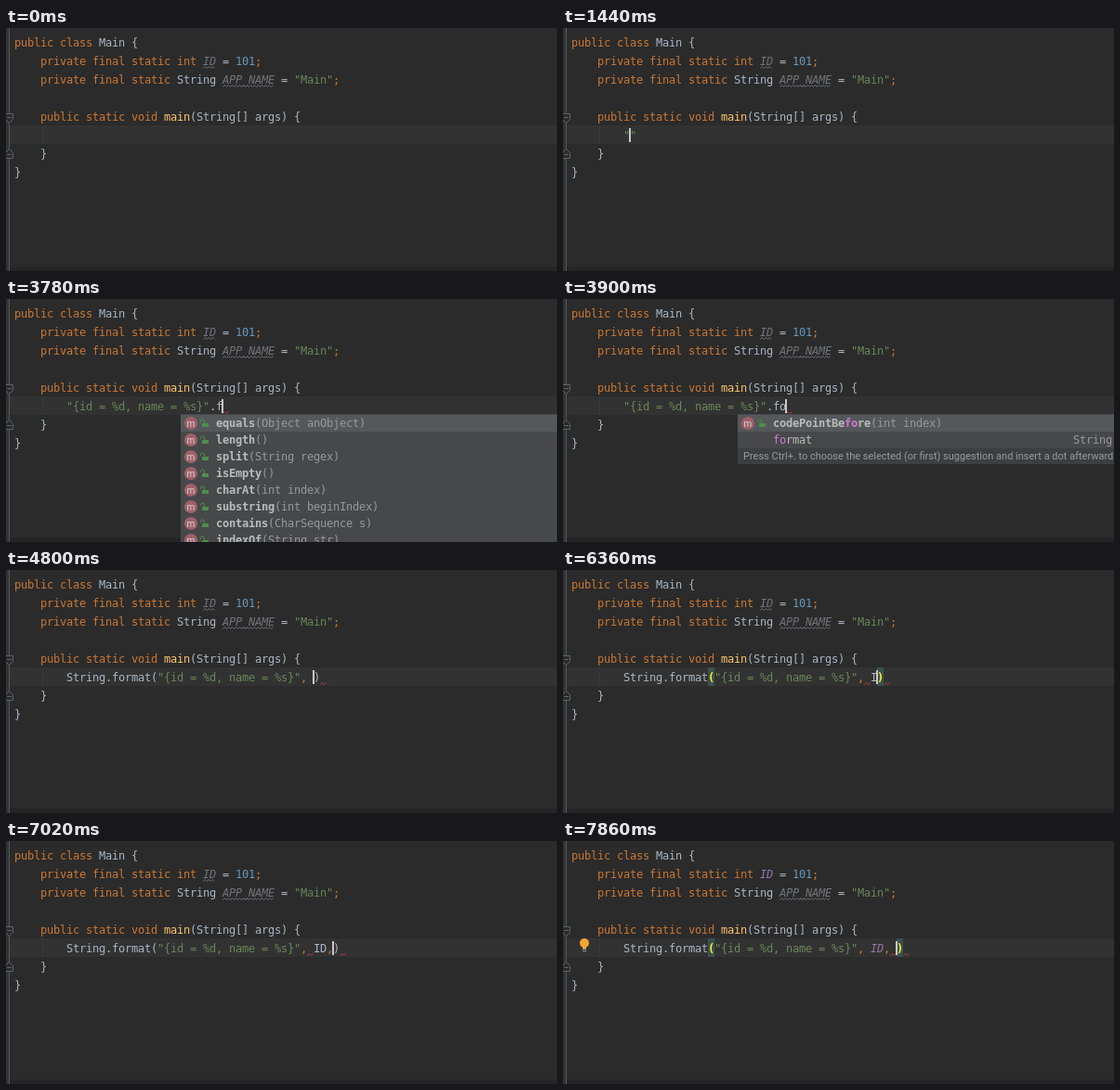
Write an HTML page that moves like this. It is 593x262 px and loops after 8 s.

```html
<!DOCTYPE html>
<html lang="en">
<head>
<meta charset="utf-8">
<title>Postfix completion</title>
<style>
  html, body { margin: 0; width: 100%; height: 100%; overflow: hidden; background: #2b2b2b; }
  svg { display: block; }
  text {
    font: 12px "DejaVu Sans Mono", monospace;
    letter-spacing: calc(7px - 1ch);
    white-space: pre;
    fill: #a9b7c6;
  }
  .keyword { fill: #cc7832; }
  .string { fill: #6a8759; }
  .number { fill: #6897bb; }
  .method { fill: #ffc66d; }
  .unused { fill: #72737a; font-style: italic; }
  .field { fill: #9876aa; font-style: italic; }
  .pair { fill: #ffef28; font-weight: bold; }
  .item { fill: #bbb; }
  .bold { font-weight: bold; }
  .match { fill: #d17ad6; }
  .dim { fill: #999; }
  .value { fill: #8c8c8c; font-style: italic; }
  .ad { font: 11px Roboto, sans-serif; letter-spacing: 0; fill: #999; }
  .badge { font: 10px Roboto, sans-serif; letter-spacing: 0; fill: #d4d4d4; text-anchor: middle; }
</style>
</head>
<body>
<svg id="stage" width="593" height="262" viewBox="0 0 593 262"></svg>
<script>
const LOOP = 8000, CHAR = 7, LEFT = 65, ROW = 18;
const TEMPLATE = '"{id = %d, name = %s}"';
const CALL = `String.format(${TEMPLATE}, `;
const HINT = 'Press Ctrl+. to choose the selected (or first) suggestion and insert a dot afterwards';

const method = (name, args) => ({ icon: 'm', name, tail: `(${args})`, bold: true });
const type = (icon, name, pkg) => ({ icon, name, tail: ` (${pkg})` });
const before = method('codePointBefore', 'int index');
const postfix = { name: 'format', right: 'String.format(expr)' };

const dotItems = [
  method('equals', 'Object anObject'), method('length', ''), method('split', 'String regex'),
  method('isEmpty', ''), method('charAt', 'int index'), method('substring', 'int beginIndex'),
  method('contains', 'CharSequence s'), method('indexOf', 'String str')
];
const fItems = [
  before, postfix, method('indexOf', 'int ch'), method('lastIndexOf', 'int ch'),
  method('replaceFirst', 'String regex, String replacement'),
  method('offsetByCodePoints', 'int index, int codePointOffset'),
  method('indexOf', 'String str'), method('lastIndexOf', 'String str')
];
const idItems = [
  { icon: 'f', name: 'ID', value: ' ( = 101)', locked: true, bold: true },
  type('E', 'ID', 'com.sun.xml.internal.bind.v2.model.core)'),
  type('I', 'ID_ASSIGNMENT_POLICY_ID', 'org.omg.PortableServer'),
  type('I', 'ID_UNIQUENESS_POLICY_ID', 'org.omg.PortableServer'),
  type('I', 'IDLEntity', 'org.omg.CORBA.portable'),
  type('I', 'IDLType', 'org.omg.CORBA'),
  { ...type('C', 'IDLTypeHelper', 'org.omg.CORBA'), abstract: true },
  type('C', 'IDLType', 'com.sun.corba.se.impl.presentation.rmi')
];
const popup = (col, match, items) => ({ col, match, items });
const typed = (code, caret = code.length) => ({ code, caret });

// Each step changes part of the editor state and keeps the rest.
const steps = [
  [0, { code: '', caret: null, tail: false, gap: null, bulb: false, pair: false, resolved: false, popup: null }],
  [600, { caret: 0 }],
  [1440, typed('""', 1)],
  [1680, { tail: true }],
  [2220, { bulb: true }],
  [2460, { ...typed(TEMPLATE, 21), bulb: false }],
  [2700, { caret: 22 }],
  [3300, { bulb: true }],
  [3360, { ...typed(TEMPLATE + '.'), bulb: false }],
  [3420, { popup: popup(23, '', dotItems) }],
  [3780, typed(TEMPLATE + '.f')],
  [3840, { popup: popup(23, 'f', fItems) }],
  [3900, { ...typed(TEMPLATE + '.fo'), popup: popup(23, 'fo', [before, postfix]) }],
  [4020, { ...typed(TEMPLATE + '.for'), popup: popup(23, 'for', [before, postfix]) }],
  [4260, typed(TEMPLATE + '.form')],
  [4380, { popup: popup(23, 'form', [postfix]) }],
  [4800, { ...typed(CALL + ')', 38), popup: null }],
  [4860, { pair: true }],
  [5100, { gap: 37 }],
  [5640, { bulb: true }],
  [5880, { caret: null }],
  [6360, { ...typed(CALL + 'I)', 39), bulb: false }],
  [6420, typed(CALL + 'ID)', 40)],
  [6540, { popup: popup(38, 'ID', idItems) }],
  [7020, { ...typed(CALL + 'ID,)', 41), popup: null, pair: false }],
  [7080, typed(CALL + 'ID, )', 42)],
  [7140, { pair: true }],
  [7320, { gap: 41, resolved: true }],
  [7860, { bulb: true }]
];
let merged = {};
const states = steps.map(([at, change]) => (merged = { ...merged, ...change, at }));

const rect = (x, y, w, h, fill) => `<rect x="${x}" y="${y}" width="${w}" height="${h}" fill="${fill}"/>`;
const path = (d, stroke, fill = 'none') => `<path d="${d}" stroke="${stroke}" fill="${fill}"/>`;
const span = (cls, s) => `<tspan class="${cls}">${s}</tspan>`;
const text = (x, y, s, cls = '') => `<text x="${x}" y="${y}" class="${cls}">${s}</text>`;
const colX = col => LEFT + CHAR * col;

function wave(x, y, width, color) {
  let d = `M${x + .5} ${y + 2.5}`;
  for (let i = 0; i < Math.floor((width - 1) / 2); i++) d += `l2 ${i % 2 ? 2 : -2}`;
  return path(d, color);
}
const errorWave = col => wave(colX(col), 121, 7, '#bc3f3c');

const TOKEN = /"[^"]*"|\b(?:public|private|class|final|static|int|void)\b|[,;]|\d+|\bmain\b|\b(?:ID|APP_NAME)\b/g;
function highlight(code, idClass) {
  return code.replace(TOKEN, token => {
    if (token[0] === '"') return span('string', token);
    if (/\d/.test(token)) return span('number', token);
    if (token === 'main') return span('method', token);
    if (token === 'ID') return span(idClass, token);
    if (token === 'APP_NAME') return span('unused', token);
    return span('keyword', token);
  });
}

const ICON = { m: '#a0606a', f: '#b5864a', E: '#3f7890', I: '#4f8a4a', C: '#3f7890' };
function icon(item, x, y) {
  const bars = item.abstract ? rect(x - 7, y - 6, 2, 12, '#9aa7b0') + rect(x + 5, y - 6, 2, 12, '#9aa7b0') : '';
  const color = item.locked ? '#9c4f48' : '#4c8f4a';
  const shackle = item.locked
    ? `M${x + 13.5} ${y}v-2a2 2 0 0 1 4 0v2`
    : `M${x + 14.5} ${y}v-2a2 2 0 0 0 -4 0v1`;
  return `<circle cx="${x}" cy="${y}" r="7" fill="${ICON[item.icon]}"/>` + bars +
    text(x, y + 3.5, item.icon, 'badge') + path(shackle, color) + rect(x + 12, y, 7, 4, color);
}

function drawPopup({ col, match, items }) {
  const x = colX(col), left = x - 38, top = 125, bottom = top + items.length * ROW;
  let out = rect(left, top - 1, 500, bottom - top + 1, '#46484a') + rect(left, top, 500, ROW, '#55585a');
  items.forEach((item, i) => {
    const y = top + i * ROW, at = item.name.indexOf(match), end = at + match.length;
    const name = match
      ? item.name.slice(0, at) + span('match', item.name.slice(at, end)) + item.name.slice(end)
      : item.name;
    if (item.icon) out += icon(item, x - 27, y + 9);
    out += text(x, y + 13, span(item.bold ? 'bold' : '', name) +
      span('dim', item.tail || '') + span('value', item.value || ''), 'item');
    if (item.right) out += text(549, y + 13, item.right, 'dim');
  });
  return out + rect(left, bottom, 500, 17, '#3c3f41') + text(left + 6, bottom + 12, HINT, 'ad');
}

const bulb = `<circle cx="23" cy="110" r="5" fill="#f2a633"/>` +
  rect(21, 113, 4, 3, '#f2a633') + rect(21, 116, 4, 1, '#9a9a9a') + rect(21, 118, 4, 1, '#9a9a9a');

const backdrop = rect(0, 0, 593, 262, '#2b2b2b') + rect(0, 257, 593, 5, '#252525') +
  rect(0, 0, 3, 262, '#313335') + rect(0, 105, 593, 20, '#323232') +
  rect(39, 105, 1, 20, '#393939') + rect(3, 0, 1, 262, '#555759') +
  path('M-.5 92.5H7.5V98.5L3.5 102.5L-.5 98.5ZM1 96.5H6', '#606366', '#2b2b2b') +
  path('M-.5 140.5H7.5V134.5L3.5 130.5L-.5 134.5ZM1 136.5H6', '#606366', '#2b2b2b');

function draw(s) {
  const idClass = s.resolved ? 'field' : 'unused';
  const lines = [
    [0, 0, 'public class Main {'],
    [1, 4, 'private final static int ID = 101;'],
    [2, 4, 'private final static String APP_NAME = "Main";'],
    [4, 4, 'public static void main(String[] args) {'],
    [6, 4, '}'],
    [7, 0, '}']
  ];
  let out = backdrop;
  for (const [row, col, code] of lines) out += text(9 + CHAR * col, 20 + 20 * row, highlight(code, idClass));
  if (!s.resolved) out += wave(212, 41, 14, '#72737a');
  out += wave(233, 61, 56, '#72737a');
  out += text(LEFT, 120, highlight(s.code, s.resolved ? 'field' : ''));
  if (s.pair) {
    for (const col of [13, s.code.length - 1]) {
      out += rect(colX(col), 105, CHAR, 20, '#3b514d') + text(colX(col), 120, s.code[col], 'pair');
    }
  }
  if (s.tail) out += errorWave(s.code.length);
  if (s.gap !== null) out += errorWave(s.gap);
  if (s.caret !== null) out += rect(colX(s.caret) - 1, 108, 2, 15, '#c8c8c8');
  if (s.bulb) out += bulb;
  if (s.popup) out += drawPopup(s.popup);
  return out;
}

const stage = document.getElementById('stage');
const start = performance.now();
let shown = null;
function tick() {
  const time = (performance.now() - start) % LOOP;
  const state = states.filter(s => s.at <= time).pop();
  if (state !== shown) {
    stage.innerHTML = draw(state);
    shown = state;
  }
  requestAnimationFrame(tick);
}
tick();
</script>
</body>
</html>
```
